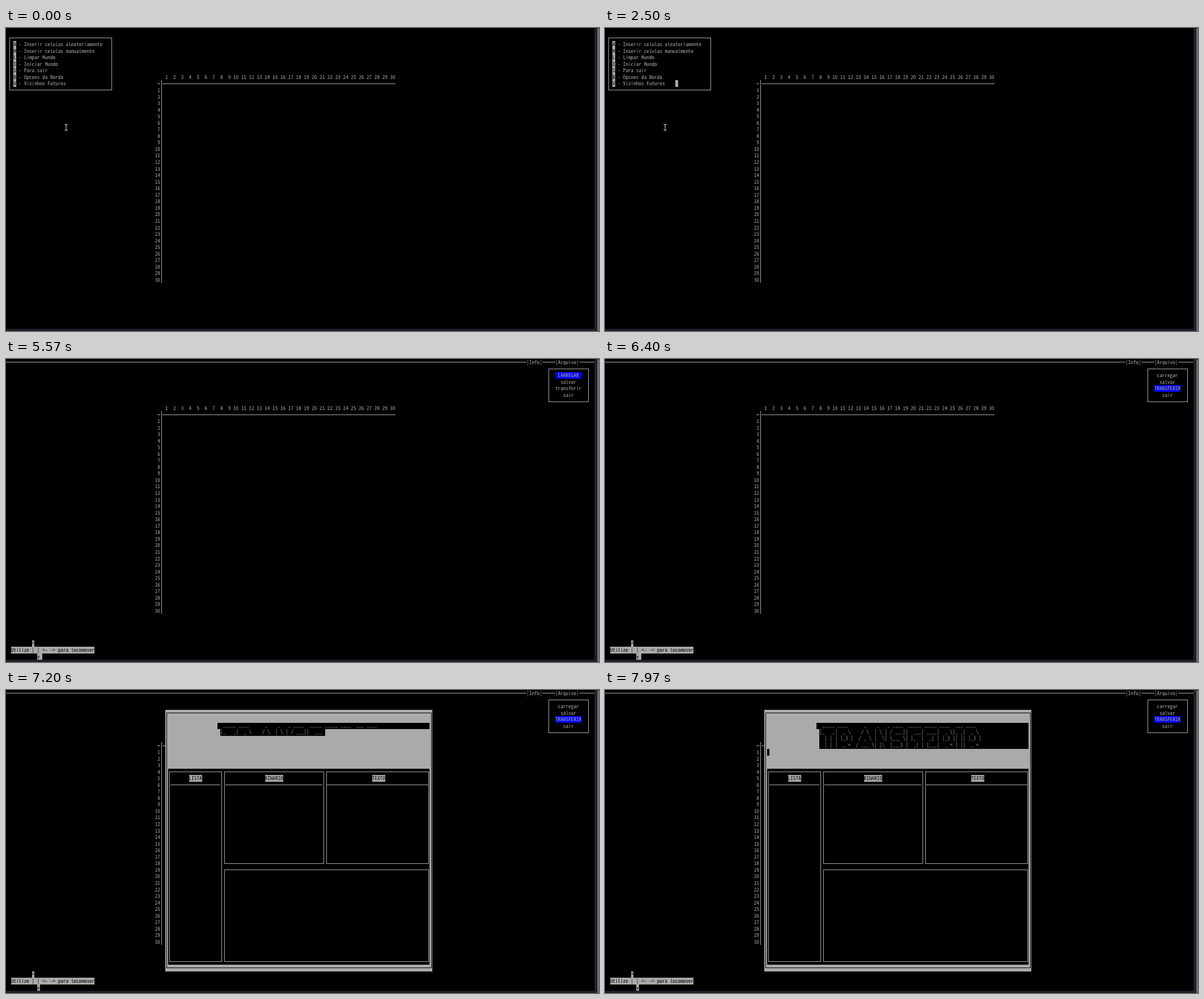
Animation, 1046 px wide and 535 px high, one loop 8 s. Source, as an HTML page:

```html
<!DOCTYPE html>
<html lang="pt">
<head>
<meta charset="utf-8">
<title>Terminal</title>
<style>
  html, body { margin: 0; width: 100%; height: 100%; overflow: hidden; background: #000; }
  svg { display: block; }
  text {
    font-family: 'Noto Sans Mono CJK JP', 'Noto Sans Mono', 'DejaVu Sans Mono', monospace;
    font-stretch: condensed;
    font-variant-ligatures: none;
    text-rendering: geometricPrecision;
    white-space: pre;
  }
</style>
</head>
<body>
<svg id="stage" width="1046" height="535" viewBox="0 0 1046 535"></svg>
<script>
const NS = 'http://www.w3.org/2000/svg';
const LOOP = 8000, CELL = 4.6165, LINE = 11.55, SHIFT = -0.5;
const GREY = '#aaaaa9', BLACK = '#000', BLUE = '#0000ee';
const stage = document.getElementById('stage');

function add(parent, tag, attrs) {
  const node = document.createElementNS(NS, tag);
  for (const key in attrs) node.setAttribute(key, attrs[key]);
  return parent.appendChild(node);
}
const group = (parent = stage) => add(parent, 'g', {});
const show = (node, on) => node.setAttribute('visibility', on ? 'inherit' : 'hidden');

// Geometry is given in terminal columns and rows, snapped to whole pixels.
const px = col => Math.round(col * CELL + SHIFT);
const py = row => Math.round(row * LINE);
const midX = col => Math.floor((col + 0.5) * CELL);
const midY = row => Math.floor((row + 0.5) * LINE);

function rect(parent, x, y, width, height, fill) {
  return add(parent, 'rect', { x, y, width, height, fill });
}
function block(parent, col, row, cols, rows, fill) {
  return rect(parent, px(col), py(row), px(col + cols) - px(col), py(row + rows) - py(row), fill);
}
function rule(parent, col, row, endCol) {
  rect(parent, px(col), midY(row), px(endCol) - px(col), 1, GREY);
}
function frame(parent, left, top, right, bottom, stroke = GREY) {
  add(parent, 'rect', {
    x: midX(left) + 0.5, y: midY(top) + 0.5,
    width: midX(right) - midX(left), height: midY(bottom) - midY(top),
    fill: 'none', stroke
  });
}

// Pick the size at which one glyph fills one cell.
const probe = add(stage, 'text', { 'font-size': 100 });
probe.textContent = '0'.repeat(20);
const fontSize = CELL * 2000 / probe.getComputedTextLength();
probe.remove();

function write(parent, col, row, string, fill = GREY, back) {
  if (back) block(parent, col, row, string.length, 1, back);
  const node = add(parent, 'text', {
    x: col * CELL + SHIFT, y: row * LINE + 9, 'font-size': fontSize, fill
  });
  node.textContent = string;
  return node;
}

// Desktop edge and scrollbar
rect(stage, 0, 0, 1046, 535, BLACK);
rect(stage, 1038, 0, 8, 535, '#211f2a');
rect(stage, 0, 531, 1046, 4, '#211f2a');
rect(stage, 1043, 1, 3, 534, '#6c6c70');

// World table
const table = group();
const numbers = Array.from({ length: 30 }, (_, i) => String(i + 1).padStart(2));
write(table, 60, 7, numbers.join(' '));
numbers.forEach((label, i) => write(table, 57, 9 + i, label));
rule(table, 58, 8, 59);
rule(table, 60, 8, 149);
rect(table, midX(59), py(8), 1, py(39) - py(8), GREY);

// Start menu
const startMenu = group();
frame(startMenu, 1, 1, 40, 9);
[
  ['A', 'Inserir celulas aleatoriamente'],
  ['M', 'Inserir celulas manualmente'],
  ['L', 'Limpar Mundo'],
  ['I', 'Iniciar Mundo'],
  ['S', 'Para sair'],
  ['B', 'Opcoes da Borda'],
  ['V', 'Vizinhos Futuros']
].forEach(([key, label], i) => {
  write(startMenu, 3, 2 + i, key, BLACK, GREY);
  write(startMenu, 5, 2 + i, '- ' + label);
});
add(startMenu, 'path', {
  d: 'M103.5 170.5h5M106 171v9M103.5 180.5h5',
  fill: 'none', stroke: '#e4e4e4'
});

// Menu bar with help box
const bar = group();
rule(bar, 0, 0, 199);
rule(bar, 205, 0, 210);
rule(bar, 219, 0, 225);
write(bar, 199, 0, '|Info|');
write(bar, 210, 0, '|Arquivo|');
write(bar, 10, 43, '^', BLACK, GREY);
write(bar, 2, 44, 'Utilize | | <- -> para locomover', BLACK, GREY);
write(bar, 12, 45, 'v', BLACK, GREY);
const infoHot = group(bar), fileHot = group(bar);
write(infoHot, 199, 0, '|Info|', GREY, BLUE);
write(fileHot, 210, 0, '|Arquivo|', GREY, BLUE);

// File menu
const fileMenu = group();
frame(fileMenu, 207, 1, 222, 6);
const items = ['carregar', 'salvar', 'transferir', 'sair'].map((label, i) => {
  const plain = group(fileMenu), hot = group(fileMenu);
  const pad = (10 - label.length) / 2;
  write(plain, 210 + pad, 2 + i, label);
  block(hot, 210, 2 + i, 10, 1, BLUE);
  write(hot, 210 + pad, 2 + i, label.toUpperCase());
  return { plain, hot };
});

// Transfer window
const dialog = group();
block(dialog, 61, 3, 102, 40, GREY);
frame(dialog, 61, 3, 162, 42, BLACK);
block(dialog, 62, 12, 100, 30, BLACK);
frame(dialog, 62, 12, 82, 41);
frame(dialog, 83, 12, 121, 26);
frame(dialog, 122, 12, 161, 26);
frame(dialog, 83, 27, 161, 41);
rule(dialog, 63, 14, 82);
rule(dialog, 84, 14, 121);
rule(dialog, 122.5, 14, 161.5);
write(dialog, 70, 13, 'LISTA', BLACK, GREY);
write(dialog, 99, 13, 'BINARIO', BLACK, GREY);
write(dialog, 140, 13, 'TEXTO', BLACK, GREY);

// The glyphs sit a little high so that underscores stay inside their row.
const LIFT = 0.13;
const banner = [
  String.raw`  _____ ____      _    _   _ ____  _____ _____ ____  ___ ____`,
  String.raw`|_   _|  _ \    / \  | \ | / ___||  ___| ____|  _ \|_ _|  _ \ `,
  String.raw`  | | | |_) |  / _ \ |  \| \___ \| |_  |  _| | |_) || || |_) |`,
  String.raw`  | | |  _ <  / ___ \| |\  |___) |  _| | |___|  _ < | ||  _ <`
].map((string, i) => {
  const col = i ? 82 : 81, row = 5 + i;
  return {
    string, col, row,
    back: block(dialog, col, row, 1, 1, BLACK),
    text: write(dialog, col, row - LIFT, '')
  };
});

const cursor = block(stage, 0, 0, 1, 1, GREY);
function placeCursor(on, col, row, fill = GREY) {
  show(cursor, on);
  cursor.setAttribute('x', px(col));
  cursor.setAttribute('y', py(row));
  cursor.setAttribute('width', px(col + 1) - px(col));
  cursor.setAttribute('height', py(row + 1) - py(row));
  cursor.setAttribute('fill', fill);
}

// Types the banner; a finished line clears to the window edge.
function typeBanner(t) {
  let left = Math.floor((t - 6700) * 0.195 + 4.8);
  let at = [81, 5];
  for (const { string, col, row, back, text } of banner) {
    const count = Math.max(0, Math.min(left, string.length));
    const done = left >= string.length;
    text.textContent = string.slice(0, count);
    back.setAttribute('width', px(done ? 162 : col + count) - px(col));
    if (left >= 0) at = done ? [62, row + 1] : [col + count, row];
    left -= string.length + 2;
  }
  placeCursor(true, ...at, BLACK);
}

function render(t) {
  const inBar = t >= 4130, inMenu = t >= 5570, inDialog = t >= 6700;
  show(startMenu, !inBar);
  show(bar, inBar);
  show(infoHot, inBar && t < 5170);
  show(fileHot, t >= 5170 && !inMenu);
  show(fileMenu, inMenu);
  show(dialog, inDialog);

  const selected = t < 6170 ? 0 : t < 6400 ? 1 : 2;
  items.forEach(({ plain, hot }, i) => {
    show(plain, inMenu && i !== selected);
    show(hot, inMenu && i === selected);
  });

  if (inDialog) typeBanner(t);
  else if (inMenu) placeCursor(t < 6130 || t >= 6200, 13, 45);
  else if (inBar) placeCursor((t >= 4170 && t < 4770) || t >= 5200, 24, 7);
  else placeCursor(t >= 100 && Math.floor((t - 100) / 600) % 2 === 0, 27, 8);
}

function tick() {
  render(performance.now() % LOOP);
  requestAnimationFrame(tick);
}
tick();
</script>
</body>
</html>
```
